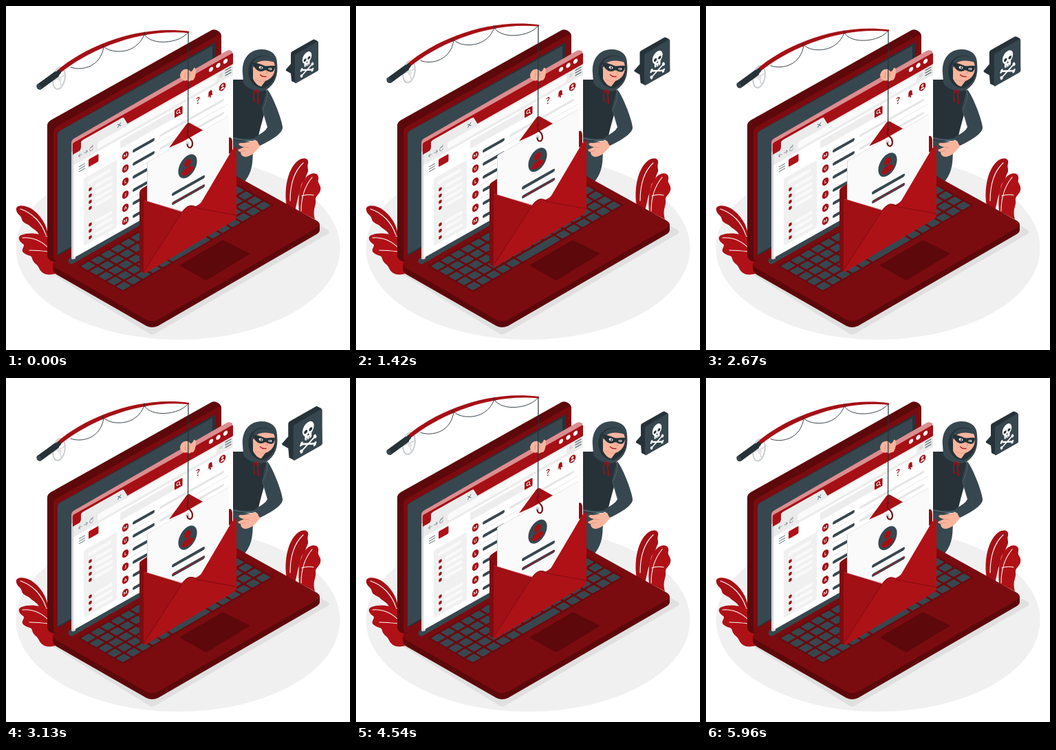
Write an HTML page with a canvas that moves like this. It is 500 px wide and 500 px high and loops after 6000 ms.

```html
<!DOCTYPE html>
<html lang="en">
<head>
<meta charset="utf-8">
<title>Phishing</title>
<style>
html, body { margin: 0; width: 100%; height: 100%; overflow: hidden; background: #fff; }
canvas { display: block; width: 500px; height: 500px; }
</style>
</head>
<body>
<canvas id="stage"></canvas>
<script>
const LOOP = 6000, SLOPE = -0.565;
const RED = '#b01116', MID = '#a51015', WINE = '#7a0c10', DEEP = '#5d080b';
const SLATE = '#37474f', INK = '#263238', SKIN = '#f8b59d', PALE = '#ededed';
const canvas = document.getElementById('stage');
const dpr = window.devicePixelRatio || 1;
canvas.width = canvas.height = 500 * dpr;
const ctx = canvas.getContext('2d');

function fill(d, color) {
  ctx.fillStyle = color;
  ctx.fill(new Path2D(d));
}
function line(d, color, width) {
  ctx.strokeStyle = color;
  ctx.lineWidth = width;
  ctx.lineCap = ctx.lineJoin = 'round';
  ctx.stroke(new Path2D(d));
}
function oval(x, y, rx, ry, color, turn = 0) {
  ctx.fillStyle = color;
  ctx.beginPath();
  ctx.ellipse(x, y, rx, ry, turn, 0, Math.PI * 2);
  ctx.fill();
}
function dot(x, y, r, color) { oval(x, y, r, r, color); }
function bar(x, y, w, h, color, r = h / 2) {
  ctx.fillStyle = color;
  ctx.beginPath();
  ctx.roundRect(x, y, w, h, r);
  ctx.fill();
}
function label(s, x, y, size, color) {
  ctx.fillStyle = color;
  ctx.font = `700 ${size}px Lato, Inter, sans-serif`;
  ctx.textAlign = 'center';
  ctx.textBaseline = 'middle';
  ctx.fillText(s, x, y);
}
// Draws on an upright plane that rises to the right.
function onPlane(x, y, draw) {
  ctx.save();
  ctx.transform(1, SLOPE, 0, 1, x, y);
  draw();
  ctx.restore();
}

function drawFloor() {
  oval(250, 352, 235.5, 133, '#f0f0f0');
  fill('M58 384L208 476Q212 479 217 476L468 331Q472 328 467 325L440 310Z', '#e0e0e0');
}

function drawLeaves() {
  fill('M409 295C403 272 408 238 424 225C432 219 441 221 439 229C437 235 441 238 438 243C435 249 436 252 431 257C427 262 429 270 425 276L420 298Z', MID);
  line('M432 228C419 240 413 260 413 283', '#fff', 1.1);
  fill('M426 298C424 278 427 258 438 247C446 240 456 243 454 252C452 258 459 260 457 268C455 275 449 276 450 283C451 291 445 295 449 310Z', RED);
  line('M445 249C434 262 429 280 429 298M430 276Q438 273 447 275', '#fff', 1.1);

  fill('M61 334C60 318 50 303 36 294C25 288 13 289 15 297C16 303 22 304 23 310C24 316 32 316 36 321C41 325 46 327 49 334Z', MID);
  line('M21 295C39 301 52 315 58 333', '#fff', 1.1);
  fill('M62 336C51 331 34 328 22 333C16 336 19 342 25 346C29 349 20 354 26 359C32 364 37 361 38 367C40 375 45 374 48 381C53 392 64 392 75 388L75 348Z', RED);
  line('M24 337C43 335 58 345 71 362M34 355Q46 355 61 357', '#fff', 1.1);
}

function drawThief() {
  fill('M326 194L363 198C356 209 361 222 356 238Q353 248 346 256L326 256Z', SLATE);
  fill('M326 107L352 107C360 118 373 117 380 124C383 138 371 168 366 194Q350 199 326 194Z', INK);
  line('M330 192Q350 197 365 193', '#455a64', 2.5);
  // arm
  fill('M379 121C385 124 401 164 402 176C403 185 384 196 369 203Q362 199 362 190Q377 183 380 176L372 149Z', SLATE);
  line('M379 122C382 134 376 144 373 151L380 175', '#56666e', .8);
  fill('M365 196C357 195 350 200 342 199C336 199 337 203 346 205L337 209Q338 212 341 212C341 217 345 220 350 219C359 217 364 210 369 204Z', SKIN);
  line('M346 205L353 206M341 212L348 210', '#df8975', .8);
  // hood and face
  fill('M344 98C342 77 354 63 371 63C386 63 394 71 394 83C396 101 391 114 378 122C367 127 351 121 345 112Z', SLATE);
  fill('M353 101C350 84 359 73 373 72C385 72 392 77 392 88C393 104 387 114 375 119C363 120 355 112 353 101Z', INK);
  fill('M359 94C358 83 366 75 377 75C387 76 391 81 391 89C391 99 386 106 377 109L371 117Q364 116 359 106Z', SKIN);
  fill('M357 92C356 80 365 72 377 73C386 74 391 78 391 82C381 79 370 78 363 84Z', SLATE);
  fill('M358 83C364 82 369 84 376 87C380 88 385 86 391 87C391 93 388 97 383 95.5C380 95 377 92 375 94C370 97 362 94 358 83Z', INK);
  oval(370.5, 89.5, 2.9, 1.9, '#fff', .25);
  oval(384, 91.5, 2.4, 1.6, '#fff', .1);
  dot(371, 89.7, 1.2, INK);
  dot(383.7, 91.5, 1.1, INK);
  line('M379 94L380.5 98L378 98', '#df8975', .8);
  line('M369.5 100Q373 103.5 378 102.5', RED, 1.3);
  line('M362 106Q369 111 376 109', '#e39c86', .8);
  line('M363 122C358 128 360 135 361 139M364 122C367 129 366 135 367 142M363 122Q367 122 368 127', MID, 1.6);
}

function drawBubble(scale) {
  ctx.save();
  ctx.translate(430, 80);
  ctx.scale(scale, scale);
  ctx.translate(-430, -80);
  fill('M414 69Q414 67 416 66L446 49Q448 48 449 49L453 51L454 93L421 112L415 109L414 98L407 94Q406 92 408 91L414 84Z', INK);
  fill('M420 73Q420 71 422 70L452 52Q454 51 454 53V92Q454 94 452 95L422 112Q420 113 420 111Z', SLATE);
  onPlane(437.5, 80, () => {
    line('M-8 8.5L8 17M-8 17L8 8.5', '#fff', 2);
    for (const sx of [-1, 1]) for (const sy of [-1, 1]) {
      dot(sx * 8.4, 12.8 + sy * 3.4, 1.5, '#fff');
      dot(sx * 7.6, 12.8 + sy * 5.3, 1.5, '#fff');
    }
    oval(0, -5, 6.8, 8, '#fff');
    bar(-4, 0, 8, 7.2, '#fff', 2);
    dot(-2.9, -3, 2, INK);
    dot(2.9, -3, 2, INK);
    fill('M0 0L-1.2 2.6H1.2Z', INK);
    line('M-1.4 5V7M1.4 5V7', SLATE, .7);
  });
  ctx.restore();
}

function drawKeys() {
  ctx.save();
  // hinge direction on x, toward the front on y
  ctx.transform(1, -.575, 1, .575, 106, 378);
  bar(-1, -1, 220, 66, '#6a0a0e', 2);
  const cols = 15, pitch = 14.5;
  for (let row = 0; row < 5; row++) {
    for (let c = 0; c < cols; c++) {
      if (row === 4 && c > 4 && c < 9) continue;
      bar(c * pitch + 1.2, row * 12.8 + 1.4, 11.8, 10, SLATE, 1.2);
    }
  }
  bar(5 * pitch + 1.2, 4 * 12.8 + 1.4, 3 * pitch + 11.8, 10, SLATE, 1.2);
  ctx.restore();
}

function drawLaptop() {
  const base = 'M70 371L302 238Q320 233 338 249L450 311Q461 317 451 323L221 456Q212 460 204 456L73 381Q66 376 70 371Z';
  for (let y = 9; y > 0; y--) {
    ctx.save();
    ctx.translate(0, y);
    fill(base, DEEP);
    ctx.restore();
  }
  fill(base, WINE);
  drawKeys();
  fill('M252 377L315 340L355 360L291 399Z', DEEP);

  // lid
  fill('M60 174Q60 169 65 166L299 35Q303 33 308 36Q313 39 313 44V232L78 369Q70 373 65 370Q60 367 60 362Z', DEEP);
  fill('M69 183Q69 178 74 175L305 44Q313 39 313 46V232L78 369Q69 373 69 365Z', WINE);
  fill('M75 187Q75 183 79 181L302 54Q305 52 305 56V230L75 363Z', INK);
  fill('M75 187Q75 183 79 181L300 58V232L75 361Z', SLATE);
  line('M95 370.5L318 243', SLATE, 9);
}

function drawIcons() {
  for (const x of [201, 211.5, 222]) dot(x, 5.7, 3.2, '#fff');
  line('M8.5 23H13.5M8.5 23L10.7 20.8M8.5 23L10.7 25.2M16.5 23H21.5M21.5 23L19.3 20.8M21.5 23L19.3 25.2', '#8a969c', .9);
  line('M28.8 20.5A2.4 2.9 0 1 0 29.4 24M29 18V21H26.5', '#8a969c', .9);
  line('M65.5 9L70 13.5M70 9L65.5 13.5', '#546e7a', .9);
  line('M222 19H230M222 22.7H230M222 26.4H230', '#607078', 1.4);
  bar(213, 20, 5, 5, '#d8d8d8', 1);
  line('M9.5 39H17.5M9.5 42.5H17.5M9.5 46H17.5', '#7b878d', 1.4);
  bar(23, 36, 14.5, 11, RED, 1.5);

  bar(69, 35, 80, 11.5, PALE, 1.5);
  bar(148, 35, 11.5, 11.5, MID, 1);
  ctx.strokeStyle = '#fff';
  ctx.lineWidth = 1;
  ctx.beginPath();
  ctx.arc(153.3, 40.2, 2.3, 0, 7);
  ctx.stroke();
  line('M155 42.2L156.6 44', '#fff', 1);

  label('?', 182, 41, 13, MID);
  fill('M196 43.5L197.3 42V39Q197.3 36 200 35.5Q202.7 36 202.7 39V42L204 43.5Z', MID);
  dot(200, 44.9, 1.2, MID);
  oval(217.6, 40.5, 4.8, 5.4, MID);
  dot(217.6, 38.6, 1.7, '#fff');
  fill('M214.8 43.8Q214.8 41.2 217.6 41.2Q220.4 41.2 220.4 43.8Z', '#fff');
}

function drawWindow() {
  fill('M95 199Q95 195 99 192.5L321 65Q325 63 329 66V70L101 203V367Q95 370 95 366Z', '#dc8d90');
  fill('M95 212L101 209V367Q95 370 95 366Z', '#d2d2d2');
  onPlane(97, 200, () => {
    bar(1, 0, 232, 167, '#fff', 2);
    bar(0, -.5, 233, 17.5, MID, 2);
    bar(1, 16, 232, 16, '#ebebeb', 0);
    fill('M8 17Q12 16 12 11V6Q12 3 15 3H70Q74 3 75 6L80 17Z', '#ebebeb');
    bar(36, 18.5, 173, 10, '#fafafa', 3);
    drawIcons();

    bar(16, 60, 48, 98, '#f0f0f0', 2);
    bar(22, 67, 34, 5, '#fafafa');
    for (const y of [80.7, 90, 99, 108, 132, 141, 150.7]) {
      bar(23.3, y - 2.4, 4.4, 4.6, MID, 1.5);
      bar(32, y - 2.3, 26, 4.6, '#fafafa');
    }
    [...'MULJAM'].forEach((s, i) => {
      const y = 60.5 + i * 19;
      oval(76.6, y, 4.7, 5.4, MID);
      label(s, 76.6, y + .4, 6, '#fff');
      bar(87, y - 2, 32, 4.4, SLATE);
      bar(126, y - 2, 94, 3.6, '#e6e6e6');
      bar(70, y + 9.3, 156, .7, '#e2e2e2', 0);
    });
  });
}

function drawFingers() {
  fill('M253 101C254 94 259 91 264 92C267 93 268 96 270 96L273 90C276 88 277 95 275 102C274 106 272 109 269 108Q266 111 263 108Q259 110 257 107Q254 107 253 101Z', SKIN);
  line('M261 97L260 104M267 97L267 103', '#df8975', .8);
}

function drawEnvelope() {
  // back panel and open flap
  fill('M194 271Q194 268 197 266L206 260L321 193Q329 187 329 199V212L201 290L194 286Z', '#8a0d11');
  fill('M237 206L262 172Q265 168 269 171L287 181L264 194Z', MID);
  // letter
  fill('M205 228L209 225V304H205Z', '#d9d9d9');
  fill('M206 229Q206 226 208 225L322 160Q324 159 324 162V260L262 304L206 292Z', '#fafafa');
  line('M206 227L323 160', '#e4e4e4', .8);
  onPlane(264, 233, () => {
    oval(0, 0, 13.6, 15.8, SLATE);
    oval(0, -5, 4.8, 5.4, MID);
    fill('M-8.5 8.5Q-8.5 1.5 0 1.5Q8.5 1.5 8.5 8.5Q4 12 0 12Q-4 12-8.5 8.5Z', MID);
    bar(-23, 26.3, 48, 4.6, SLATE);
    bar(-23, 39.5, 48, 4.6, SLATE);
    for (let x = -19; x < 24; x += 6) dot(x, 41.8, 1.5, RED);
  });
  oval(264, 200, 2.6, 3, '#d5d5d5');
  // folded front
  fill('M194 271L201 281V388L196 386Q194 385 194 382Z', '#7d0c10');
  fill('M200 282L258 300L230 350L202 388Q200 388 200 386Z', '#a01015');
  fill('M335 204V306Q310 302 273 292Q281 289 284 285L327 212Q331 206 335 204Z', RED);
  fill('M200 386L255 301Q261 292 267 290Q273 289 279 294L335 304Q335 309 333 311L205 387Q200 390 200 386Z', '#ad1217');
  line('M201 385L255 301Q261 292 267 290.5Q273 289.5 279 294L334 304', '#850d12', 1.1);
  line('M201 283L257 299', '#c23a3e', .6);
}

function drawRod() {
  line('M94 89C111 95 138 88 142 59C144 60 149 66 164 66C181 66 195 57 201 41C211 58 252 55 265 38', INK, .9);
  line('M265 38L264.5 184', INK, 1.2);
  ctx.strokeStyle = '#c9cdd0';
  ctx.lineWidth = 2;
  ctx.beginPath();
  ctx.ellipse(77, 105, 8.6, 16, .18, 0, 7);
  ctx.stroke();
  line('M73 92L81 118M69 108L85 101', '#d5d8da', 1.6);
  fill('M74 94C118 56 195 27 266 36.8L266 39.2C195 32 121 63 78 98Z', MID);
  line('M141 56V60M201 38V42', INK, 1.2);
  ctx.lineCap = 'butt';
  line('M49 117L73 99.5', INK, 9);
  line('M72 100L76.5 96.5', INK, 6.5);
  oval(48, 117.5, 2.6, 4.4, SLATE, -.6);
  dot(78, 107, 3, '#e4e6e7');
  // hook
  line('M264.5 181C262.5 188 264 190 268 193C272 197 272 204 268 206Q264 206 263.5 201.5', WINE, 2.1);
  dot(264.5, 182, 1.6, WINE);
}

function drawScene(t) {
  const half = (t % 3000) / 1500;
  const lift = -10 * (half < 1 ? half : 2 - half);
  const p = t / LOOP;
  let beat = 0;
  if (p < .1) beat = p / .1;
  else if (p < .3) beat = (.3 - p) / .2;
  else if (p > .4 && p < .6) beat = 1 - Math.abs(p - .5) / .1;

  ctx.setTransform(dpr, 0, 0, dpr, 0, 0);
  ctx.fillStyle = '#fff';
  ctx.fillRect(0, 0, 500, 500);
  drawFloor();
  drawLeaves();
  drawThief();
  drawLaptop();
  drawWindow();
  drawFingers();
  ctx.save();
  ctx.translate(0, lift);
  drawEnvelope();
  drawRod();
  ctx.restore();
  drawBubble(1 + .3 * beat);
}

let start;
function tick(now) {
  start ??= now;
  drawScene(Math.max(0, now - start) % LOOP);
  requestAnimationFrame(tick);
}
drawScene(0);
requestAnimationFrame(tick);
</script>
</body>
</html>
```
